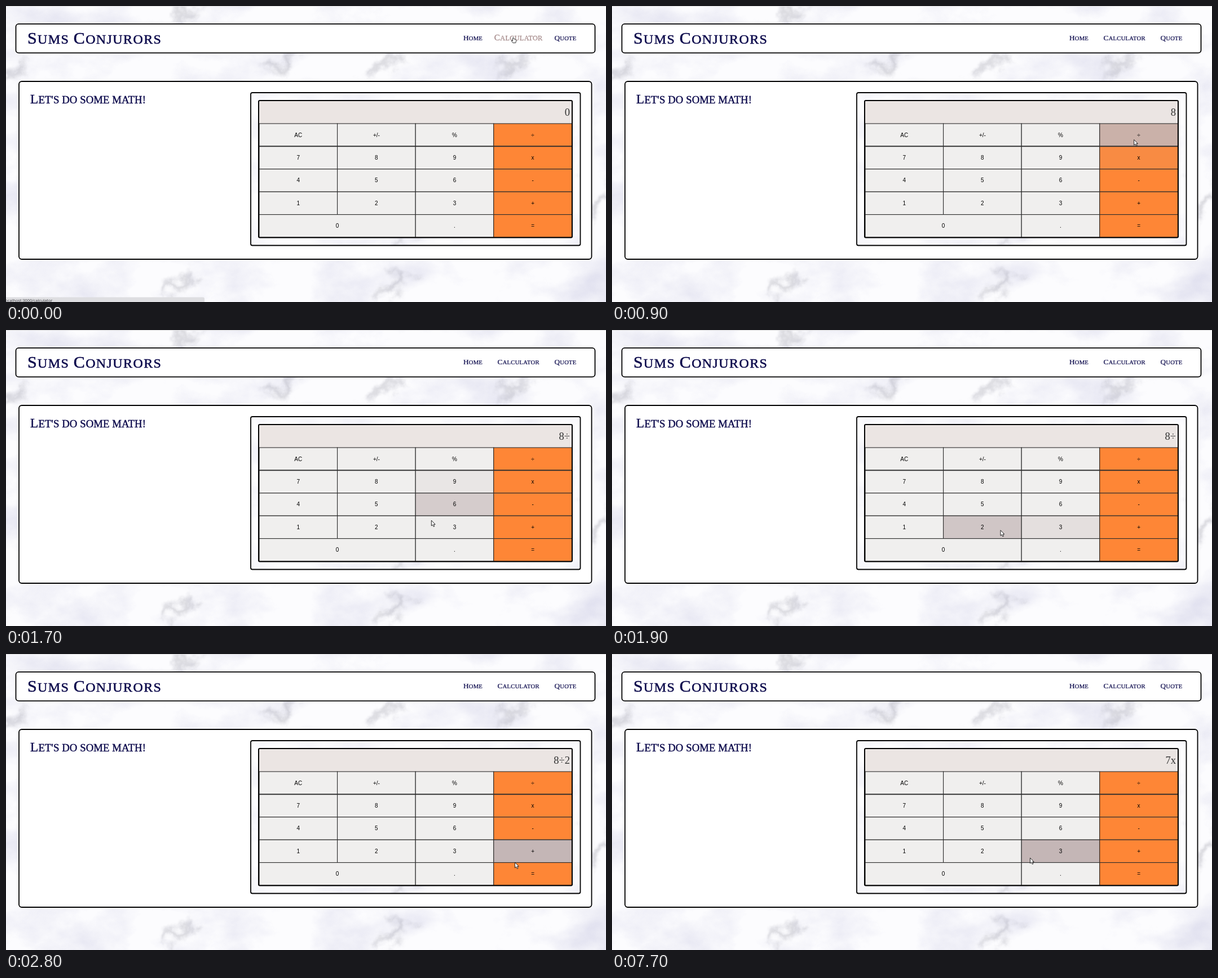
Animation of 1064 by 526 pixels, one loop 8 s. Source, as an HTML page:

```html
<!DOCTYPE html>
<html lang="en">
<head>
<meta charset="utf-8">
<title>Calculator</title>
<style>
html, body { margin: 0; width: 100%; height: 100%; overflow: hidden; background: #fff; }
svg { position: absolute; left: 0; top: 0; width: 1064px; height: 526px; display: block; }
#back { will-change: transform; }
.caps { font-family: "Liberation Serif", "Times New Roman", serif; fill: #0c0a4c; stroke: #0c0a4c; }
.key { font: 10px "Liberation Sans", Arial, sans-serif; text-anchor: middle; fill: #000; }
.box { fill: #fff; stroke: #000; stroke-width: 1.8; }
</style>
</head>
<body>
<svg id="back" viewBox="0 0 1064 526">
  <defs>
    <filter id="cloud" x="0" y="0" width="1064" height="526" filterUnits="userSpaceOnUse" color-interpolation-filters="sRGB">
      <feTurbulence type="fractalNoise" baseFrequency=".009 .013" numOctaves="5" seed="8"/>
      <feColorMatrix values="0 0 0 0 .83  0 0 0 0 .83  0 0 0 0 .91  1.6 0 0 0 -.68"/>
    </filter>
    <filter id="vein" x="-60" y="-60" width="1184" height="646" filterUnits="userSpaceOnUse" color-interpolation-filters="sRGB">
      <feTurbulence type="fractalNoise" baseFrequency=".025" numOctaves="5" seed="5" result="n"/>
      <feGaussianBlur in="SourceGraphic" stdDeviation="4" result="b"/>
      <feDisplacementMap in="b" in2="n" scale="70" xChannelSelector="R" yChannelSelector="G"/>
    </filter>
    <clipPath id="ring"><rect x="434" y="154" width="584" height="271" rx="3"/></clipPath>
    <g id="marble">
      <rect width="1064" height="526" fill="#fcfcfe"/>
      <rect width="1064" height="526" filter="url(#cloud)" opacity=".8"/>
      <g id="veins" filter="url(#vein)" fill="#9494a2"/>
    </g>
  </defs>
  <use href="#marble"/>
  <rect width="1064" height="1" fill="#dededf"/>
  <rect class="box" x="17.5" y="31.8" width="1027" height="51.6" rx="5"/>
  <rect class="box" x="23" y="134" width="1015.5" height="316" rx="5"/>
  <g clip-path="url(#ring)"><use href="#marble" y="-70" opacity=".75"/></g>
  <rect class="box" x="434" y="154" width="584.5" height="271.5" rx="3" style="fill:none"/>
</svg>
<svg id="front" viewBox="0 0 1064 526">
  <g id="words"></g>
  <rect x="448" y="168" width="556" height="243" rx="2" fill="#ebe5e3"/>
  <g id="keys"></g>
  <path d="M449 249.4H1003" stroke="#2c2c2c" stroke-width="1.7"/>
  <rect x="448" y="168" width="556" height="243.4" rx="2" fill="none" stroke="#000" stroke-width="2"/>
  <text id="total" x="1000" y="195" text-anchor="end" fill="#333" font-size="18.6" font-family="'Liberation Serif', 'Times New Roman', serif"></text>
  <g id="status">
    <path d="M0 517.5H349Q352 517.5 352 520.5V526H0Z" fill="#dedee1"/>
    <text x="-1.5" y="525.6" font-size="7.3" font-family="'Noto Sans', sans-serif" fill="#45454a">ocalhost:3000/calculator</text>
  </g>
  <path id="hand" d="M898.5 62V56.5Q899.5 55 900.5 56.5V58.5L904 59.5Q905 60 904.7 62L903.8 65.5H898.8L896 61.5Q896.5 60 898.5 62Z" fill="#fff" stroke="#222" stroke-width=".9"/>
  <path id="arrow" d="M.5 .3V10L2.7 8L4.3 11.5L6 10.8L4.5 7.4H7.3Z" fill="#fff" stroke="#111" stroke-width=".9" stroke-linejoin="round"/>
</svg>
<script>
const LOOP = 8000, STEP = 100, FADE = 200;
const $ = id => document.getElementById(id);

function add(parent, tag, attrs, text) {
  const el = document.createElementNS("http://www.w3.org/2000/svg", tag);
  for (const k in attrs) el.setAttribute(k, attrs[k]);
  if (text) el.textContent = text;
  parent.appendChild(el);
  return el;
}

// Capitals at full size, the rest as smaller capitals
function caps(text, x, y, size, anchor = "start", gap = 0) {
  const el = add($("words"), "text", {
    x, y, class: "caps", "text-anchor": anchor, "letter-spacing": gap, "stroke-width": size * .018
  });
  for (const part of text.match(/[A-Z]|[^A-Z]+/g))
    add(el, "tspan", { "font-size": /[A-Z]/.test(part) ? size : size * .8 }, part.toUpperCase());
  return el;
}

const spots = [[310, 490], [690, 494], [482, 106], [325, 12], [665, 106], [14, 118], [1050, 355], [900, 100]];
for (const [x, y] of spots) {
  const turn = { transform: `translate(${x} ${y}) rotate(-38)` };
  add($("veins"), "ellipse", { ...turn, rx: 40, ry: 14, opacity: .14 });
  add($("veins"), "ellipse", { ...turn, rx: 30, ry: 4, opacity: .3 });
}

caps("Sums Conjurors", 38, 67, 30, "start", 1.4);
caps("Let's do some math!", 43, 173, 23.4, "start", .1);
const nav = (text, x, size = 13.3) => caps(text, x, 61.3, size, "middle", .25);
nav("Home", 828);
nav("Quote", 992);
const link = nav("Calculator", 908.7), linkHot = nav("Calculator", 908.7, 15.4);
linkHot.style.fill = linkHot.style.stroke = "#a58a8a";

const LEFT = 449, TOP = 209, W = 138.6, H = 40.4;
const labels = ["AC +/- % ÷", "7 8 9 x", "4 5 6 -", "1 2 3 +", "0 . ="];
const keys = labels.flatMap((line, r) => {
  let x = LEFT;
  return line.split(" ").map(name => {
    const w = name == "0" ? 2 * W : W, y = TOP + r * H;
    const rect = add($("keys"), "rect", { x, y, width: w, height: H, stroke: "#2c2c2c", "stroke-width": 1.1 });
    add($("keys"), "text", { x: x + w / 2, y: y + 23.5, class: "key" }, name);
    const base = x > LEFT + 2.5 * W ? [254, 134, 54] : [240, 239, 238];
    const key = { rect, base, x, y, w };
    x += w;
    return key;
  });
});

// Pointer moves between hard cuts: time, x, y
const moves = [
  [[500, 700, 262], [550, 702, 264], [650, 875, 260], [700, 898, 258], [800, 925, 238], [1300, 926, 234],
   [1470, 890, 244], [1500, 872.5, 268], [1720, 742, 345], [1900, 688.5, 355.5], [2100, 684, 354],
   [2350, 684, 354], [2550, 865, 366], [2800, 902, 370]],
  [[6900, 931, 262]],
  [[7300, 900, 281]],
  [[7700, 741, 362]]
];
const shown = [[0, "0"], [600, "8"], [1300, "8÷"], [2300, "8÷2"], [6900, "7"], [7300, "7x"]];
const hot = [196, 182, 182];
const mix = (a, b, k) => a + (b - a) * k;
const show = (el, on) => el.style.display = on ? "" : "none";

function pointer(move, t) {
  const next = move.findIndex(p => p[0] > t);
  if (next < 0) return move[move.length - 1].slice(1);
  const a = move[Math.max(0, next - 1)], b = move[next];
  const k = Math.max(0, (t - a[0]) / (b[0] - a[0]));
  return [mix(a[1], b[1], k), mix(a[2], b[2], k)];
}

// Share of the last moments that the pointer spent over a key, eased
function heat(key, trail) {
  const over = trail.filter(([x, y]) => x >= key.x && x < key.x + key.w && y >= key.y && y < key.y + H);
  const k = over.length / trail.length;
  return k * k * (3 - 2 * k);
}

function draw(t) {
  const start = t < 500;
  for (const el of [$("status"), $("hand"), linkHot]) show(el, start);
  for (const el of [link, $("arrow")]) show(el, !start);
  $("total").textContent = shown.filter(s => s[0] <= t).pop()[1];

  const move = moves.filter(m => m[0][0] <= t).pop();
  const trail = move ? Array.from({ length: 40 }, (_, i) => pointer(move, t - i * FADE / 40)) : [[0, 0]];
  $("arrow").setAttribute("transform", `translate(${trail[0]})`);
  for (const key of keys) {
    const k = heat(key, trail);
    key.rect.setAttribute("fill", `rgb(${key.base.map((v, i) => Math.round(mix(v, hot[i], k)))})`);
  }
}

let last = -1;
const begin = performance.now();
function tick() {
  const t = Math.floor((performance.now() - begin) % LOOP / STEP) * STEP;
  if (t != last) draw(last = t);
  requestAnimationFrame(tick);
}
tick();
</script>
</body>
</html>
```
